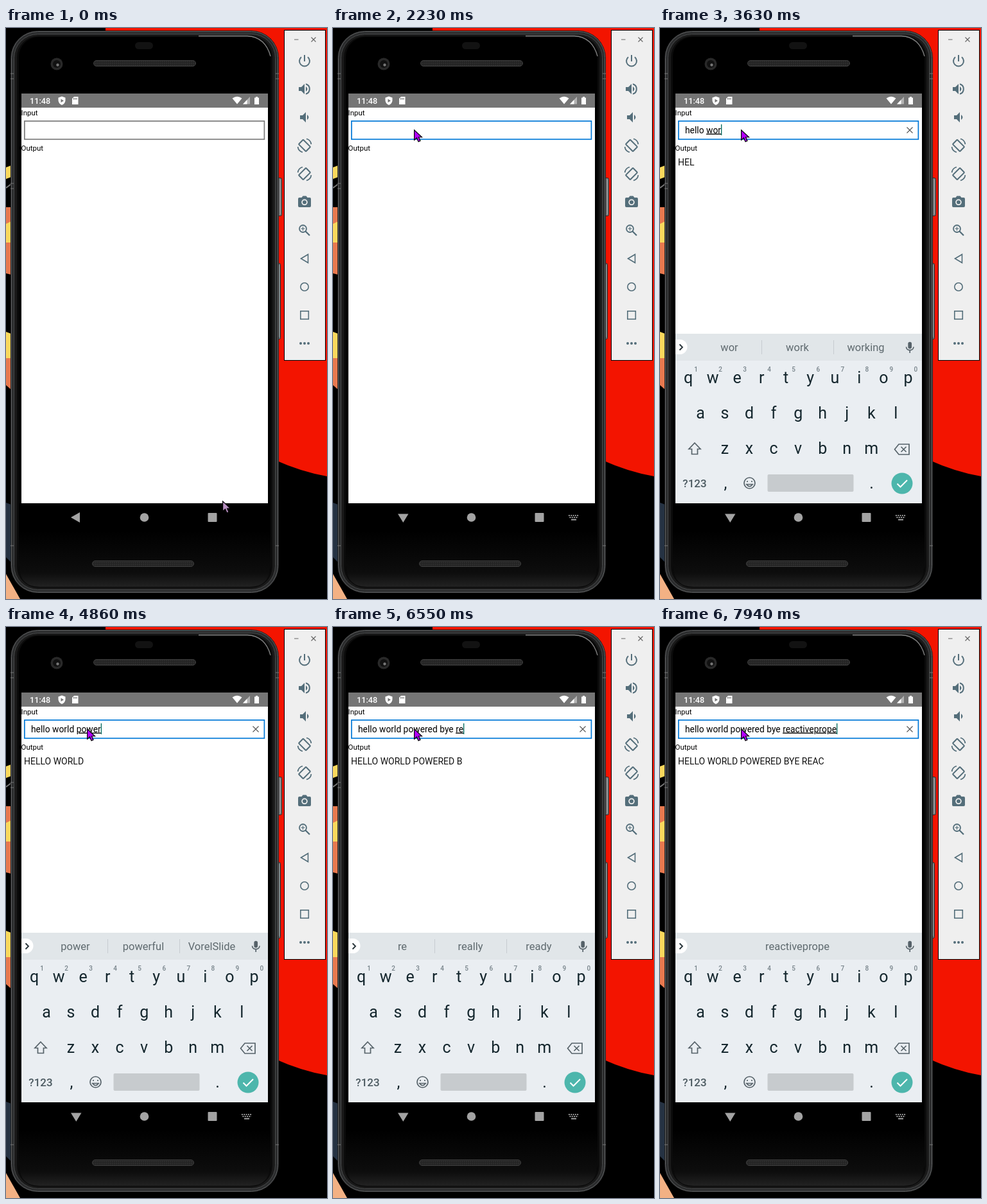
An HTML page for the animation above (8 s loop, 500 px wide and 889 px high).

```html
<!DOCTYPE html>
<html lang="en">
<head>
<meta charset="utf-8">
<title>Delayed upper-case input</title>
<style>
  html, body { margin: 0; width: 100%; height: 100%; overflow: hidden; background: #000; }
  svg { display: block; width: 100vw; height: 100vh; }
  text { font-family: Roboto, sans-serif; white-space: pre; }
  .mid { text-anchor: middle; }
  .line { fill: none; stroke: #546e7a; stroke-width: 2; }
  .hint { font-size: 16.5px; fill: #5f6a6f; text-anchor: middle; }
  .key { font-size: 25px; fill: #14262d; text-anchor: middle; }
  .digit { font-size: 10px; font-weight: 500; fill: #77838a; text-anchor: middle; }
  .word { text-decoration: underline #444; text-decoration-thickness: .8px; text-underline-offset: 2px; }
</style>
</head>
<body>
<svg viewBox="0 0 500 889" preserveAspectRatio="none">
  <defs>
    <linearGradient id="chin" x2="0" y2="1">
      <stop offset="0" stop-color="#000"/><stop offset=".75" stop-color="#0d0d0d"/><stop offset="1" stop-color="#222"/>
    </linearGradient>
    <pattern id="mesh" width="3" height="3" patternUnits="userSpaceOnUse">
      <rect width="3" height="3" fill="#222"/><circle cx="1" cy="1" r=".7" fill="#444"/>
    </pattern>
  </defs>

  <!-- desktop -->
  <rect width="500" height="889"/>
  <path fill="#f31400" d="M155 0H500V698Q460 691 420 673L155 300Z"/>
  <path fill="#fbd85c" d="M0 217L8 214V232L0 235ZM0 300H8V336H0ZM0 473L8 476V514H0Z"/>
  <path fill="#e8794f" d="M0 279H8V301L0 305ZM0 334H8V384L0 382ZM0 514H8V563L0 556Z"/>
  <path fill="none" stroke="#777" stroke-width="2" d="M0 249L8 243"/>
  <path fill="#253243" d="M0 739L8 742V832L0 824Z"/>
  <path fill="#f3b184" d="M0 850L22 889H0Z"/>

  <!-- phone -->
  <g fill="#77797b" stroke="#2a2a2a">
    <rect x="421.5" y="233.5" width="8" height="59" rx="2"/>
    <rect x="420.5" y="366.5" width="7" height="118" rx="2"/>
  </g>
  <path stroke="#9c9ea0" d="M427.5 236V290M425.5 369V481"/>
  <rect x="7" y="4" width="418" height="876" rx="43" fill="#1a1a1a"/>
  <rect x="8.5" y="5.5" width="415" height="873" rx="41" fill="#2b2c2d" stroke="#626466"/>
  <rect x="12.5" y="9.5" width="407" height="865" rx="37" fill="#1a1a1a" stroke="#484a4b"/>
  <rect x="17" y="12.5" width="398" height="859" rx="33" fill="#0b0b0b"/>
  <rect x="20" y="14" width="392" height="856" rx="31"/>
  <path fill="url(#chin)" d="M20 783H412V838Q410 870 380 870H52Q22 870 20 838Z"/>
  <path fill="none" stroke="#aaa" stroke-opacity=".75" stroke-width="1.3" d="M300 12.500H376Q404 14 412 44"/>
  <path stroke="#777" d="M7 71H12M7 79H12M420 71H425M420 79H425M7 242H12M7 250H12M7 806H12M420 806H425"/>
  <rect x="201" y="22" width="28" height="11" rx="5.500" fill="#121212"/>
  <g fill="url(#mesh)" stroke="#3c3c3c">
    <rect x="136.500" y="50.500" width="159" height="9" rx="4.500"/>
    <rect x="134.500" y="829.500" width="158" height="9" rx="4.500"/>
  </g>
  <circle cx="79" cy="56" r="9.500" fill="#292929"/>
  <circle cx="79" cy="56" r="6" fill="#111"/>
  <circle cx="80.500" cy="57.500" r="2.200" fill="#777"/>

  <!-- app -->
  <rect x="24" y="102" width="384" height="637.900" fill="#fff"/>
  <rect x="24" y="102" width="384" height="22" fill="#757575"/>
  <g fill="#fff">
    <text x="37" y="118" font-size="12.700" font-weight="500">11:48</text>
    <path d="M87 106.500L92.500 108.500V113Q92 118 87 120Q82 118 81.500 113V108.500Z"/>
    <path fill="#757575" d="M85.500 110.500L90 113.200L85.500 116Z"/>
    <path d="M106 107H112.500V119H103V110Z"/>
    <path d="M352.500 109.500Q360 104 367.500 109.500L360 118.500Z"/>
    <path opacity=".45" d="M369 118.500L380 107V118.500Z"/>
    <path d="M369 118.500L375.500 111.700V118.500Z"/>
    <path d="M387 108.500H389V107H392V108.500H394V119H387Z"/>
  </g>
  <path stroke="#757575" stroke-width="1.200" d="M105.500 109V111.500M107.700 109V111.500M109.900 109V111.500"/>
  <g font-size="11.500">
    <text x="23.500" y="136">Input</text>
    <text x="23.500" y="191">Output</text>
  </g>
  <rect id="box" x="28.900" y="144.900" width="373.500" height="28.400" fill="#fff" stroke-width="1.700"/>
  <g id="entry" font-size="13.850">
    <text id="typed" x="39" y="163.500"><tspan id="done"></tspan><tspan id="word" class="word"></tspan></text>
    <rect id="caret" y="150" width="1.300" height="17" fill="#00695c"/>
    <path fill="none" stroke="#555" stroke-width="1.100" d="M384.500 154.500L393.500 163.500M393.500 154.500L384.500 163.500"/>
  </g>
  <text id="output" x="28" y="214" font-size="14" fill="#111"></text>

  <!-- navigation bar -->
  <g fill="#a3a3a3">
    <path id="back"/>
    <circle cx="215.500" cy="762" r="6.800"/>
    <rect x="314.500" y="755" width="14" height="14" rx="1"/>
    <g id="imeIcon">
      <path fill="none" stroke="#a3a3a3" stroke-width="1.800" stroke-dasharray="1.800 1.500" d="M367 759H383M368.500 762H382"/>
      <path d="M371 764.500H379V766.500H371Z"/>
    </g>
  </g>

  <!-- keyboard -->
  <g id="keyboard">
    <rect x="24" y="476" width="384" height="264" fill="#eaeef2"/>
    <rect x="24" y="476" width="384" height="42" fill="#e1e6e9"/>
    <path fill="#fff" d="M24 485H31A11.500 11.500 0 0 1 31 508H24Z"/>
    <path fill="none" stroke="#263238" stroke-width="1.800" d="M30.500 492.500L35 497L30.500 501.500"/>
    <path id="dividers" stroke="#c7ccd0" d="M158.500 486V508M270.500 486V508"/>
    <g id="hints"></g>
    <g fill="none" stroke="#566269" stroke-width="1.700">
      <rect x="387.200" y="489.500" width="4" height="9" rx="2" fill="#566269"/>
      <path d="M383.500 496.500Q384 501.500 389.200 501.700Q394.500 501.500 395 496.500M389.200 502V506"/>
      <path id="shift" d="M54 646L63 655.500H58.500V663.500H49.500V655.500H45Z"/>
      <path d="M365.500 656L372 648H388V664H372ZM375.500 652L383.500 660M383.500 652L375.500 660"/>
      <circle cx="139.500" cy="708.500" r="8.500"/>
      <path d="M134.800 710.500Q139.500 717 144.200 710.500ZM136 705V707M143 705V707"/>
    </g>
    <g id="keys"></g>
    <text class="mid" x="54" y="715" font-size="17" font-weight="500" fill="#4c5a61">?123</text>
    <text class="key" x="102" y="717">,</text>
    <text class="key" x="329.500" y="717">.</text>
    <rect x="167.500" y="695" width="134" height="27" rx="2" fill="#c7cbce"/>
    <circle cx="377" cy="709" r="16.500" fill="#4db6ac"/>
    <path fill="none" stroke="#fff" stroke-width="2" d="M369.500 709.500L374.500 714.500L385 704"/>
  </g>

  <!-- side panel -->
  <rect x="433.500" y="3.500" width="64" height="514" fill="#efefef" stroke="#000"/>
  <path fill="none" stroke="#666" stroke-width="1.200" d="M449 18H455.500M475.500 14.500L482.500 21.500M482.500 14.500L475.500 21.500"/>
  <g class="line">
    <path d="M465 42V52M460 45.200A8 8 0 1 0 470 45.200"/>
    <path d="M467 87.300A8 8 0 0 1 467 102.700"/>
    <path fill="#546e7a" stroke="none" d="M456 92H460L465 87V103L460 98H456ZM467 91Q472 95 467 99ZM458 136H462L467 131V147L462 142H458ZM469 135Q474 139 469 143Z"/>
    <g id="turn">
      <rect x="-5" y="-8" width="10" height="16" rx="1" transform="translate(465 183) rotate(-45)"/>
      <path stroke-width="1.700" d="M468 172.500A10.500 10.500 0 0 1 475.500 181M462 193.500A10.500 10.500 0 0 1 454.500 185"/>
    </g>
    <use href="#turn" transform="translate(930 44) scale(-1 1)"/>
    <path fill="#546e7a" stroke="none" d="M457 264H460.500L462.500 261.500H467.500L469.500 264H473Q475 264 475 266V277Q475 279 473 279H457Q455 279 455 277V266Q455 264 457 264Z"/>
    <circle cx="465" cy="271.300" r="3.900" stroke="#efefef" stroke-width="1.800"/>
    <circle cx="462.500" cy="312.500" r="5.500" stroke-width="1.800"/>
    <path stroke-width="2.300" d="M466.500 316.500L473 323"/>
    <path stroke-width="1.200" d="M459.500 312.500H465.500M462.500 309.500V315.500"/>
    <path stroke-width="1.600" d="M459.500 359L470.500 352.500V365.500Z"/>
    <circle cx="465" cy="403" r="6.200" stroke-width="1.600"/>
    <rect x="458.800" y="440.800" width="12.500" height="12.500" stroke-width="1.600"/>
    <path stroke-width="4" stroke-linecap="round" d="M459 491h.01M465 491h.01M471 491h.01"/>
  </g>

  <circle id="click" cx="127" cy="158" r="12" fill="#ff0" fill-opacity=".47"/>
  <path id="pointer" stroke="#000" stroke-width="1.200" d="M.6 .8V16.500L4.500 13L7 19L10 17.700L7.500 12H12.500Z"/>
</svg>

<script>
const LOOP = 8000, DELAY = 990;
const $ = id => document.getElementById(id);
const show = (id, on) => { $(id).style.display = on ? '' : 'none'; };

const phrase = 'hello world powered bye reactiveprope';
const keyTimes = [
  2480, 2550, 2630, 2710, 2780, 3010,
  3470, 3550, 3630, 3710, 3780, 4010,
  4480, 4550, 4630, 4710, 4780, 5010, 5240, 5320,
  5470, 5630, 5710, 6010,
  6390, 6550, 6710, 6780, 7010, 7090, 7160, 7330, 7410, 7560, 7710, 7790, 7940
];

const hintSteps = [
  [0, 'Thanks,I,We'],
  [2480, 'h,have,how'], [2550, 'he,her,hey'], [2630, 'hel,hell,help'],
  [2710, 'hell,hello,help'], [2780, 'hello,Hello,hellos'], [3090, 'and,I,there'],
  [3470, 'w,with,we'], [3550, 'wo,work,would'], [3630, 'wor,work,working'],
  [3710, 'worl,world,worlds'], [3780, 'world,worlds,World'], [4090, 'championship,of,is the'],
  [4480, 'p,please,people'], [4550, 'po,possible,point'], [4630, 'pow,power,powder'],
  [4710, 'powe,power,powered'], [4780, 'power,powerful,VorelSlide'],
  [5010, 'powere,powered,powerful'], [5240, 'powered,powerful,powers'], [5320, 'by,and,up'],
  [5470, 'b,by,be'], [5630, 'by,but,buy'], [5710, 'bye,by,byes'], [6010, 'bye,and,to'],
  [6390, 'r,right,really'], [6550, 're,really,ready'], [6710, 'rea,really,ready'],
  [6780, 'reac,react,reaction'], [7010, 'react,reaction,reacted'],
  [7090, 'reacti,reaction,reacting'], [7160, 'reactiv,reactive,reactivity'],
  [7330, 'reactive,reactivate,reactivation'],
  [7560, 'reactivepr'], [7710, 'reactivepro'], [7790, 'reactiveprop'], [7940, 'reactiveprope']
];

// time, x, y of the pointer tip
const pointerSteps = [
  [0, 337, 736], [70, 335, 727], [150, 322, 690], [230, 292, 612], [300, 246, 505],
  [380, 190, 396], [460, 140, 300], [530, 108, 236], [610, 95, 203], [690, 93, 184],
  [760, 109, 168], [830, 126, 158]
];

// time, vertical offset, opacity
const slideSteps = [[0, 0, 0], [2310, 24, .4], [2390, 4, .86], [2480, 0, 1]];

const current = (steps, t) => steps.findLast(step => step[0] <= t);
const typedAt = t => phrase.slice(0, keyTimes.filter(k => k <= t).length);

function addText(parent, className, x, y, value) {
  const node = document.createElementNS('http://www.w3.org/2000/svg', 'text');
  node.setAttribute('class', className);
  node.setAttribute('x', x);
  node.setAttribute('y', y);
  node.textContent = value;
  return parent.appendChild(node);
}

const letters = [];
[['qwertyuiop', 44, 553], ['asdfghjkl', 63, 608], ['zxcvbnm', 101, 663]].forEach(([row, x, y], r) => {
  [...row].forEach((letter, i) => {
    letters.push(addText($('keys'), 'key', x + 38.05 * i, y, letter));
    if (r === 0) addText($('keys'), 'digit', x + 12 + 38.05 * i, 534.5, (i + 1) % 10);
  });
});
const hints = [108, 214, 320.5].map(x => addText($('hints'), 'hint', x, 503, ''));

function drawInput(t) {
  const text = typedAt(t), split = text.lastIndexOf(' ') + 1;
  $('done').textContent = text.slice(0, split);
  $('word').textContent = text.slice(split);
  $('output').textContent = typedAt(t - DELAY).toUpperCase();
  show('entry', text);
  if (text) $('caret').setAttribute('x', 39 + $('typed').getComputedTextLength());
  $('box').setAttribute('stroke', t < 1760 ? '#7a7a7a' : '#0078d7');
}

function drawKeyboard(t) {
  const [, offset, opacity] = current(slideSteps, t);
  $('keyboard').setAttribute('transform', `translate(0 ${offset})`);
  $('keyboard').setAttribute('opacity', opacity);

  const caps = t < keyTimes[0];
  letters.forEach(node => {
    const value = node.textContent;
    node.textContent = caps ? value.toUpperCase() : value.toLowerCase();
  });
  $('shift').setAttribute('fill', caps ? '#566269' : 'none');

  const words = current(hintSteps, t)[1].split(',');
  const shown = words.length === 1 ? ['', words[0], ''] : words;
  hints.forEach((node, i) => { node.textContent = shown[i]; });
  show('dividers', words.length > 1);

  const open = t >= 2160;
  show('imeIcon', open);
  $('back').setAttribute('d', open ? 'M101 756.500H117.500L109.300 770Z' : 'M101 762L115 754V770Z');
}

function drawPointer(t) {
  const [, x, y] = current(pointerSteps, t);
  $('pointer').setAttribute('transform', `translate(${x} ${y})`);
  $('pointer').setAttribute('fill', t < 70 ? '#b78fc0' : '#b400ff');
  show('click', t >= 1060 && t < 1290);
}

function draw() {
  const t = performance.now() % LOOP;
  drawInput(t);
  drawKeyboard(t);
  drawPointer(t);
  requestAnimationFrame(draw);
}
draw();
</script>
</body>
</html>
```
